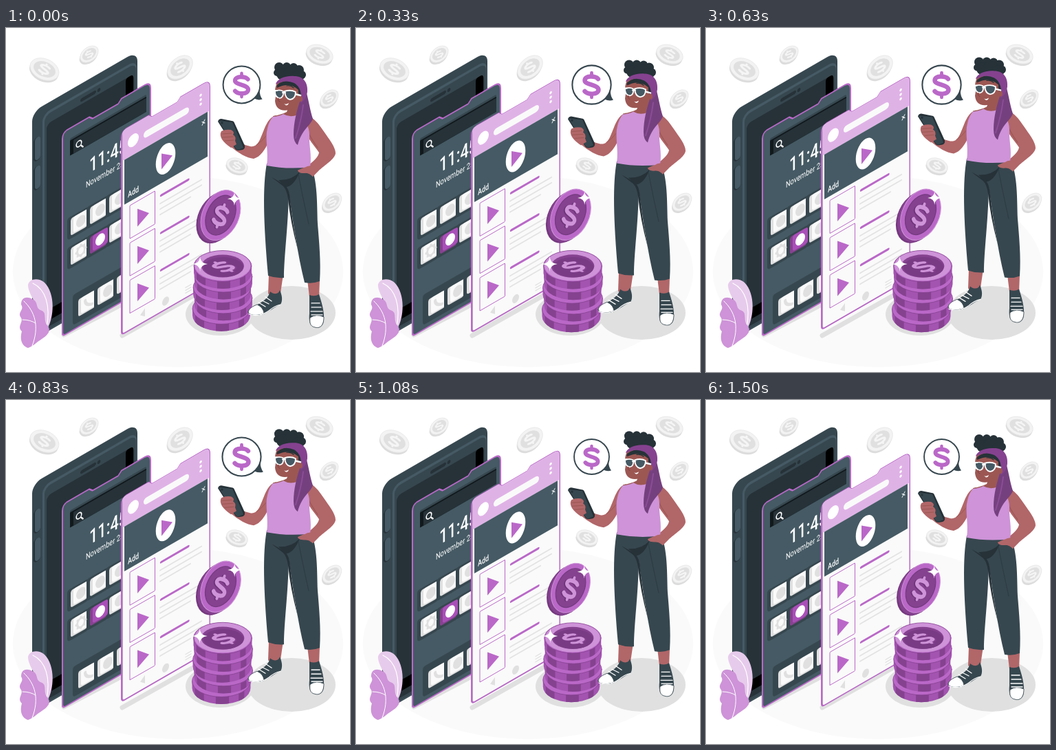
Animation, 500 px wide and 500 px high, one loop 1.54 s. Source, as an HTML page with a canvas:

```html
<!DOCTYPE html>
<html lang="en">
<head>
<meta charset="utf-8">
<title>Mobile ads</title>
<style>
  html, body { margin: 0; width: 100%; height: 100%; overflow: hidden; background: #fff; }
  canvas { display: block; width: 500px; height: 500px; }
</style>
</head>
<body>
<canvas id="stage" width="500" height="500"></canvas>
<script>
const ctx = document.getElementById('stage').getContext('2d');
const LOOP = 1540, ISO = 0.577;
const INK = '#263238', SLATE = '#37474f', STEEL = '#455a64';
const PURPLE = '#ba68c8', LILAC = '#ce93d8', PLUM = '#85428f', PALE = '#dfb2e6';
const SKIN = '#b16668', SHADE = '#9c5753', GREY = '#e0e0e0', PAPER = '#fafafa';

function at(x, y, draw, angle = 0, sx = 1, sy = sx) {
  ctx.save();
  ctx.translate(x, y);
  ctx.rotate(angle * Math.PI / 180);
  ctx.scale(sx, sy);
  draw();
  ctx.restore();
}

function iso(x, y, draw) {
  ctx.save();
  ctx.transform(1, -ISO, 0, 1, x, y);
  draw();
  ctx.restore();
}

function paint(path, fill, stroke, width = 1) {
  if (fill) { ctx.fillStyle = fill; ctx.fill(path); }
  if (stroke) {
    ctx.strokeStyle = stroke;
    ctx.lineWidth = width;
    ctx.lineCap = ctx.lineJoin = 'round';
    ctx.stroke(path);
  }
}

const shape = (d, fill, stroke, width) => paint(new Path2D(d), fill, stroke, width);
const line = (d, color, width) => shape(d, null, color, width);

function box(x, y, w, h, r, fill, stroke, width) {
  const p = new Path2D();
  p.roundRect(x, y, w, h, r);
  paint(p, fill, stroke, width);
}

function oval(x, y, rx, ry, fill, stroke, width, angle = 0) {
  const p = new Path2D();
  p.ellipse(x, y, rx, ry, angle * Math.PI / 180, 0, 2 * Math.PI);
  paint(p, fill, stroke, width);
}

// Text lies on the isometric planes, foreshortened sideways.
function text(str, x, y, size, color, weight = 400) {
  at(x, y, () => {
    ctx.font = `${weight} ${size}px Roboto, sans-serif`;
    ctx.fillStyle = color;
    ctx.fillText(str, 0, 0);
  }, 0, 0.75, 1);
}

// A dollar sign 38 units tall, centred on (x, y).
function dollar(x, y, color, scale = 1) {
  at(x, y, () => {
    line('M9-8.5C5-13-9.5-13.5-9.5-6.5C-9.5 0 9.5-1 9.5 6.5C9.5 13.5-5 13.5-9.5 8.5', color, 6.2);
    line('M0-17V-12M0 12V17', color, 4.6);
  }, 0, scale);
}

function sparkle(x, y, r) {
  at(x, y, () => shape('M0-10Q0-1.2 10 0Q0 1.2 0 10Q0 1.2-10 0Q0-1.2 0-10Z', '#fff'), 0, r / 10);
}

function drawFloor() {
  oval(250, 354, 240, 139, PAPER);
  oval(415, 414, 64, 39, GREY);
  oval(311, 416, 50, 31, GREY);
  line('M84 446L168 402M169 447L272 389', GREY, 7);
}

function paleCoin(x, y, rx, ry, angle) {
  oval(x - 1, y + 3, rx, ry, '#dcdcdc', null, 0, angle);
  oval(x, y, rx, ry, '#f3f3f3', '#e6e6e6', 0.8, angle);
  oval(x, y, rx * 0.76, ry * 0.72, GREY, null, 0, angle);
  at(x, y, () => dollar(0, 0, '#f5f5f5', 0.65), angle, rx / 21, ry / 21);
}

function drawPaleCoins() {
  paleCoin(56, 60, 22, 15, 24);
  paleCoin(121, 38, 15, 10, -38);
  paleCoin(253, 57, 21, 14, -40);
  paleCoin(456, 38, 20, 13, 20);
  paleCoin(470, 102, 15, 10, -40);
  paleCoin(336, 200, 16, 10.5, 20);
  paleCoin(474, 253, 16, 10.5, -40);
}

function drawPhone() {
  iso(38, 127, () => {
    box(0, -5, 153, 332, 14, SLATE);
    box(15, 7, 137, 319, 11, STEEL);
    box(18, 11, 133, 314, 9, SLATE);
    box(21, 25, 127, 296, 7, INK);
    box(136, 25, 11, 280, 4, '#000');
    box(24, 296, 118, 16, 2, '#000');
    box(70, 16.5, 23, 5, 2.5, INK);
    oval(97, 19, 2.4, 2.6, INK);
    for (const y of [36, 78]) {
      box(2, y, 10, 34, 5, INK);
      box(4, y, 8, 33, 4, STEEL);
    }
  });
}

const PANEL = 'M0 9Q0 1 7 0H39L44 5H81L86 0H119Q128 0 128 10V289Q128 296 122 296H5Q0 296 0 291Z';

function tile(x, y, color = PAPER, side = GREY) {
  box(x - 7, y - 3, 31, 32, 4, SLATE);
  box(x - 2, y, 24, 25, 3, side);
  box(x + 2, y, 22, 23, 3, color);
}

function gear(x, y) {
  oval(x, y, 5.5, 6.5, null, GREY, 3);
  for (let i = 0; i < 8; i++) {
    const a = i * Math.PI / 4;
    oval(x + 7 * Math.cos(a), y + 8 * Math.sin(a), 1.6, 1.6, GREY);
  }
}

function drawHomeScreen() {
  iso(82, 152, () => {
    shape(PANEL, STEEL, PURPLE, 2);
    box(11, 15, 111, 23, 2, SLATE);
    box(11, 18, 111, 22, 1, '#11191d');
    box(16, 20, 106, 20, 1, INK);
    oval(24, 30, 3.8, 4.2, null, '#fff', 1.6);
    line('M27 34L30 38', '#fff', 1.8);
    text('11:45', 39, 81, 29, '#fff', 500);
    text('November 25', 34, 100, 12.3, '#fff');
    box(15, 245, 110, 44, 4, SLATE);
    for (const [x, y] of [[14, 132], [42, 132], [70, 132], [14, 175], [70, 175], [25, 256], [53, 256], [81, 256]]) tile(x, y);
    tile(42, 175, '#a94fb8', PLUM);
    for (const [x, y] of [[27, 144], [55, 144], [83, 144], [83, 187], [66, 268]]) oval(x, y, 7, 8, GREY);
    oval(55, 187, 7, 8, '#fff');
    gear(27, 187);
    line('M33 263Q33 271 43 274', GREY, 4);
  });
}

function drawLeaves() {
  shape('M60 437C70 421 72 386 56 370C46 362 33 365 32 374C32 383 40 394 44 404C49 416 46 432 48 446Z', '#e7cbec');
  line('M39 371C58 380 65 404 59 436', '#fff', 1.2);
  shape('M32 465C20 461 21 448 23 441C15 433 27 427 21 420C17 412 27 410 22 402C22 391 31 390 38 394C48 398 42 406 50 410C61 413 53 424 60 432C67 440 60 447 52 452C44 457 39 463 32 465Z', LILAC);
  line('M26 397C42 412 49 434 38 462M24 424Q35 424 43 429', '#fff', 1);
}

function drawAdPanel(lift) {
  iso(168, 150 + lift, () => {
    shape(PANEL, PLUM, PURPLE, 2);
    ctx.save();
    ctx.clip(new Path2D(PANEL));
    box(1.5, 0, 126, 295, 3, PAPER);
    box(1.5, 0, 126, 44, 0, PALE);
    ctx.restore();
    oval(17, 23, 8, 9, '#fff');
    box(32, 20, 66, 10, 5, PAPER);
    for (const y of [14, 20.5, 27]) oval(115, y, 1.7, 1.9, '#fff');
    box(4, 44, 121, 65, 0, STEEL);
    line('M117 54L121 58M121 53L117 59', '#fff', 1);
    oval(64, 77, 14.3, 21.5, '#fff');
    shape('M58 66V89L74 78Z', PURPLE);
    text('Add', 9, 102, 12, '#fff', 500);
    for (let i = 0; i < 3; i++) at(0, i * 54.3, () => {
      box(12, 115, 36.5, 48, 1, PAPER, PURPLE, 1);
      shape('M23 126V152L40 142Z', PURPLE);
      line('M57.5 126.5H97', PURPLE, 3.4);
      line('M56 137.5H116M56 145.5H116M56 153.5H100', '#e3e3e3', 2);
    });
    shape('M27 283L34 277V289Z', GREY);
    oval(64, 284, 5, 6, GREY);
    line('M93 281H101M93 285H101M93 289H101', GREY, 1.4);
  });
}

function stackCoin(x, y) {
  const side = new Path2D('M-42 0V10A42 23 0 0 0 42 10V0Z');
  at(x, y, () => {
    paint(side, '#a353b0');
    ctx.save();
    ctx.clip(side);
    box(-38, 0, 13, 40, 0, PLUM);
    box(-8, 0, 19, 40, 0, PLUM);
    box(25, 0, 8, 40, 0, PLUM);
    ctx.restore();
    oval(0, 0, 42, 22.5, PURPLE, PLUM, 0.8);
  });
}

function drawCoins(scale) {
  at(314, 340, () => {
    ctx.translate(-314, -340);
    const drift = [-2, 1, -1, 1, 0];
    drift.forEach((dx, i) => stackCoin(315 + dx, 408 - i * 15.5));
    oval(315, 345.5, 40.5, 21.5, LILAC);
    oval(315, 346, 31, 16.5, PLUM);
    oval(316, 347.5, 29, 14.5, '#7a3b85');
    ctx.save();
    ctx.transform(0.78, -0.32, 0.72, 0.38, 316, 347);
    dollar(1, 2, PLUM);
    dollar(0, 0, LILAC);
    ctx.restore();
    oval(305.5, 276, 26.5, 39, '#75387f', null, 0, 25);
    oval(308, 274.5, 27, 39, PLUM, null, 0, 25);
    oval(312, 272, 26.5, 38.5, PURPLE, LILAC, 1, 25);
    oval(312, 272, 20, 30.5, PLUM, '#733a7e', 1.2, 25);
    at(312, 273, () => {
      dollar(-2, 1, '#6e3479');
      dollar(0, 0, LILAC);
    }, 19, 0.83, 1);
    sparkle(332, 248, 10);
    sparkle(282, 343, 11);
  }, 0, scale);
}

function drawBubble(scale) {
  at(342.5, 82.5, () => {
    shape('M18 20Q24 23 30 21Q26 16 26 8Z', SLATE);
    oval(0, 0, 26.8, 26.8, '#fff', SLATE, 2);
    dollar(0, 0.5, PURPLE);
  }, 0, scale);
}

function drawLegs() {
  shape('M382 358H403L398 392Q390 394 381 386Z', SKIN);
  shape('M438 366H456L455 391H441Z', SKIN);
  shape('M384 383C390 388 396 387 398 381C402 390 402 397 399 402C390 405 384 412 374 416C364 419 353 418 352 413C353 406 366 403 372 398C378 394 382 390 384 383Z', SLATE);
  shape('M352 413C353 407 360 404 365 402Q374 406 375 415C364 419 353 418 352 413Z', '#fff', SLATE, 0.8);
  line('M367 399L377 405M372 396L382 401M377 391L386 397', '#fff', 1.3);
  line('M353 416Q368 421 382 411Q390 404 399 402', '#fff', 1.2);
  shape('M441 388Q449 391 455 387C459 400 463 412 462 425C461 434 455 437 449 435C441 434 440 425 441 415Z', SLATE);
  shape('M442 421Q451 415 462 420C462 434 455 437 449 435C442 434 441 428 442 421Z', '#fff', SLATE, 0.8);
  line('M444 400H456M444 406H458M443 412H460M444 417H460', '#fff', 1.3);
  shape('M379 197C373 230 374 280 381 360Q392 364 404 363C404 332 410 290 411 240C417 280 424 330 434 370Q446 372 456 368C458 340 455 310 453 285C452 255 453 222 443 200Z', SLATE);
  shape('M386 217Q398 223 406 229Q412 234 413 250Q416 280 424 322Q413 280 410 248Q408 235 403 230Z', INK);
  shape('M396 221Q415 222 427 209Q418 231 406 231Z', INK);
  line('M425 213Q430 240 440 285', '#2e3d44', 1.2);
}

function drawTorso() {
  shape('M430 126C444 126 453 137 461 149C470 162 479 173 479 182C478 191 463 199 454 208L446 216Q440 210 433 211Q426 211 424 207Q433 203 440 199C448 193 454 187 455 181C449 172 438 160 432 146Z', SKIN);
  line('M439 151Q446 165 453 174', SHADE, 1.2);
  shape('M393 127C380 129 376 147 370 160C366 170 361 173 355 172C346 170 338 166 331 162L326 172C338 182 350 189 360 190C370 187 376 178 383 163Z', SKIN);
  line('M364 170Q372 165 378 157', SHADE, 1);
  shape('M388 128Q400 126 408 122L412 112H428L429 125L437 129L430 141H393Z', SHADE);
  shape('M388 129Q398 128 403 125Q413 131 424 126L433 126C434 135 441 143 441 155C440 170 445 185 442 202Q410 206 379 200C382 180 376 160 380 146Q382 136 388 129Z', LILAC);
  shape('M434 203Q441 198 449 202L452 208L446 216Q441 210 433 211Q425 211 424 207Z', SKIN);
}

function drawHand() {
  shape('M308 136Q309 132 313 132L328 135Q331 135 332 138L347 171Q348 175 344 177L338 178Q334 178 332 174Z', INK);
  shape('M309 135L329 137L345 174L338 177Q335 177 333 174Z', SLATE);
  oval(314, 138, 1.6, 1.6, INK);
  shape('M313 150Q318 147 327 148Q333 151 330 155Q335 158 333 164L335 169L327 174Q318 168 314 162Q310 155 313 150Z', SKIN);
  line('M314 154L328 153M314 159L330 158M318 164L331 163', SHADE, 1);
}

function drawHead() {
  for (const [x, y, r] of [[397, 57, 7], [408, 56, 6], [418, 57, 6], [426, 61, 7], [430, 68, 6], [394, 65, 5], [402, 67, 9], [414, 68, 12], [424, 71, 9]]) oval(x, y, r, r, INK);
  shape('M394 80C390 88 391 93 392 99L391 106C392 116 398 122 412 119C423 119 429 112 430 103L432 84Q415 70 394 80Z', SHADE);
  shape('M394 83Q402 75 423 76L431 84L429 105Q424 98 425 90Q412 78 394 87Z', INK);
  shape('M418 155C418 137 423 119 427 107L436 91C440 105 442 120 446 132C442 143 430 147 424 170Q418 166 418 155Z', '#75407e');
  line('M432 112Q429 136 421 160', '#8b4d96', 2);
  shape('M392 82C393 75 405 69 419 70C433 70 439 80 438 93Q436 105 428 109Q432 88 419 80Q406 74 392 82Z', '#85428f');
  oval(428, 103, 3, 4, SHADE);
  line('M420 96L428 98', '#fff', 2.5);
  shape('M391 92Q397 89 403 92Q404 101 398 102Q391 101 391 92Z', STEEL, '#fff', 1.7);
  shape('M405 92Q414 89 421 93Q421 103 413 104Q406 103 405 92Z', STEEL, '#fff', 1.9);
  line('M389 91L394 91M402 94H406', '#fff', 2);
  line('M394 85L399 84M408 84Q414 83 418 87', INK, 1.2);
  line('M396 102Q394 106 398 107', '#7d403d', 1);
  shape('M404 110Q407 112 411 109Q410 112.5 407 112.5Z', '#fff');
}

function drawWoman(lift) {
  at(0, lift, () => {
    drawLegs();
    drawTorso();
    drawHand();
    drawHead();
  });
}

const smooth = x => {
  const k = Math.min(1, Math.max(0, x));
  return k * k * (3 - 2 * k);
};
const mix = (a, b, k) => a + (b - a) * k;

function frame(now) {
  const t = now % LOOP;
  const lift = -4 * (1 - Math.cos(2 * Math.PI * (t + 30) / LOOP));
  // The pulse restarts part-way up on every loop.
  const pulse = mix(0.55, 1, smooth(t / 300)) * (1 - smooth((t - 800) / 280));

  ctx.fillStyle = '#fff';
  ctx.fillRect(0, 0, 500, 500);
  drawFloor();
  drawPaleCoins();
  drawPhone();
  drawHomeScreen();
  drawLeaves();
  drawAdPanel(lift);
  drawCoins(mix(0.982, 1.012, pulse));
  drawBubble(mix(0.95, 1.05, pulse));
  drawWoman(lift);
  requestAnimationFrame(frame);
}
frame(0);
</script>
</body>
</html>
```
